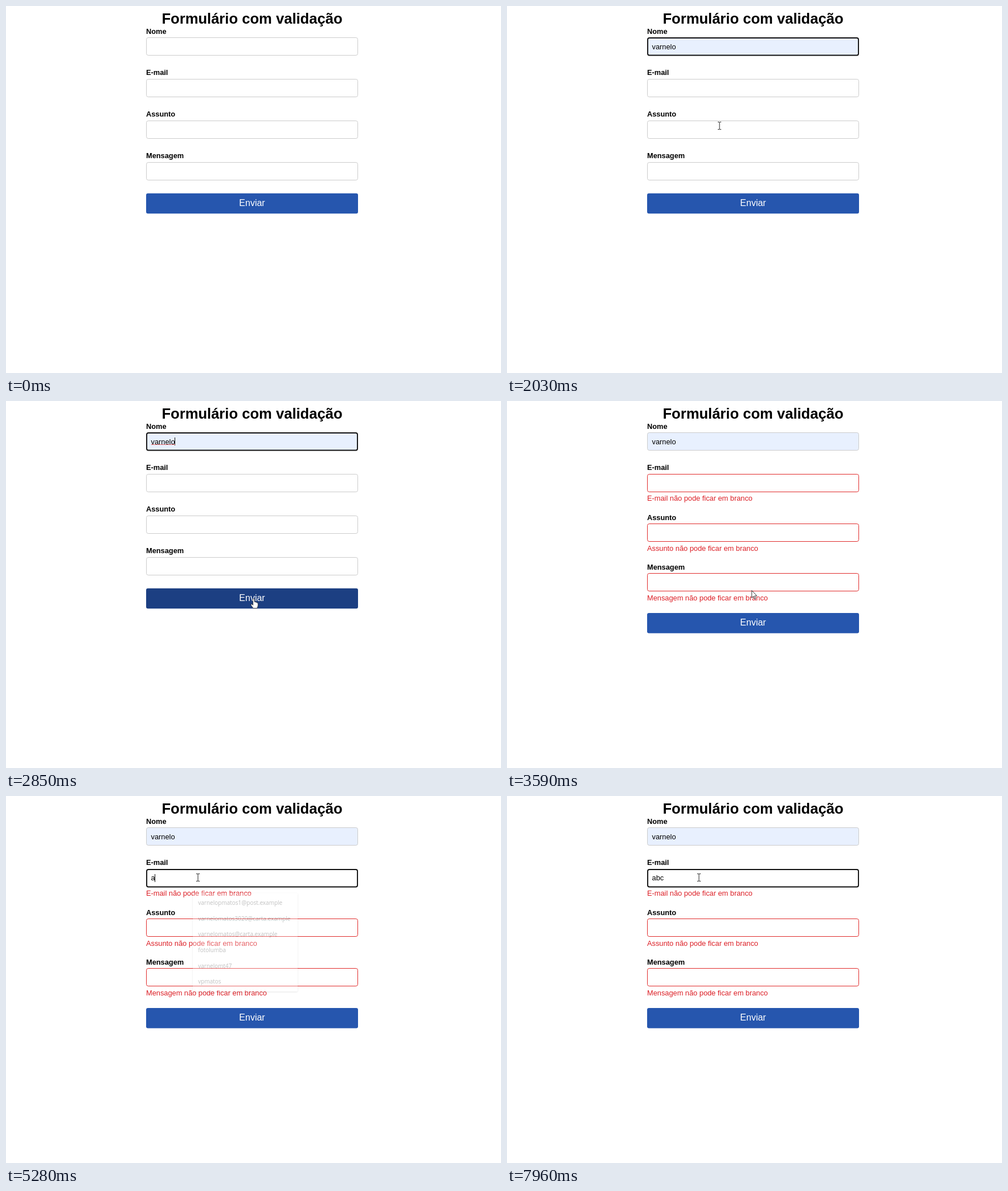
These frames come from a looping animation (869x644 px, 8000 ms). An HTML page:

```html
<!DOCTYPE html>
<html lang="pt-BR">
<head>
<meta charset="utf-8">
<title>Formulário com validação</title>
<style>
  html, body { margin: 0; width: 100%; height: 100%; overflow: hidden; background: #fff; }
  svg { display: block; width: 100%; height: 100%; }
  text { font: 12.8px "Liberation Sans", Arial, sans-serif; }
  .title { font-size: 25.6px; font-weight: bold; text-anchor: middle; }
  .label { font-weight: bold; }
  .error { fill: #dc1f26; }
  .send { font-size: 16px; fill: #fff; text-anchor: middle; }
  .menu text { font: 10px "Open Sans", "Noto Sans", sans-serif; fill: #333; }
  .tip text { font: 9.6px "Open Sans", "Noto Sans", sans-serif; fill: #444; }
  .sheet { fill: #fff; filter: drop-shadow(0 1px 1.5px rgba(0, 0, 0, .35)); }
</style>
</head>
<body>
<svg id="stage" viewBox="0 0 869 644"></svg>
<script>
const stage = document.getElementById('stage');
const LOOP = 8000, LEFT = 246, WIDTH = 372;
const NAME = 'varnelo';
const LABELS = ['Nome', 'E-mail', 'Assunto', 'Mensagem'];

const FOCUS_NAME = 730, HOVER_ITEM = 1140, PICK_ITEM = 1480, SPELLCHECK = 2540;
const SUBMIT = 2900, FOCUS_MAIL = 4080;
const KEYS = [5140, 6230, 6420];
const TIP = [5960, 6230];
const CARET_ON = [[730, 1140], [1480, 2010], [2540, 2900],
  [4080, 4680], [5140, 5690], [6230, 6900], [7430, 7960]];

const NAME_MENU = {
  x: 325, y: 94, w: 124, h: 93, peak: 341, first: 112, step: 28.5,
  items: [NAME, 'Grupo feliz KZQ.Fc', 'fddsdsds']
};
const MAIL_MENU = {
  x: 328, y: 170.5, w: 184, h: 172.5, peak: 345, first: 187.5, step: 27.6,
  items: ['varnelopmatos1@post.example', 'varnelomatos3020@carta.example',
    'varnelomatos@carta.example', 'fotolumba', 'varnelomt47', 'vpmatos']
};

// Pointer hot spot: time, x, y
const PATH = [
  [170, 778, 612], [350, 560, 390], [560, 228, 97], [720, 298, 75],
  [1000, 298, 75], [1180, 345, 112], [1480, 348, 114], [1750, 373, 206],
  [1820, 389, 253], [1900, 389, 253], [1960, 376, 226], [2030, 373, 210],
  [2200, 385, 235], [2580, 435, 345], [2900, 435, 347], [3190, 436, 380],
  [3530, 436, 380], [3590, 430, 333], [3930, 337, 143]
];

const clamp = v => Math.max(0, Math.min(1, v));
const ramp = (t, from, to) => clamp((t - from) / (to - from));
const within = (t, [from, to]) => t >= from && t < to;

const pen = document.createElement('canvas').getContext('2d');
pen.font = '12.8px "Liberation Sans", Arial, sans-serif';
const textWidth = s => pen.measureText(s).width;

const text = (x, y, s, cls = '') => `<text x="${x}" y="${y}" class="${cls}">${s}</text>`;
const rect = (x, y, w, h, attrs) => `<rect x="${x}" y="${y}" width="${w}" height="${h}" ${attrs}/>`;

// Each error line below a field pushes the following rows down.
const rowTop = (row, failed) => 55.6 + 72.8 * row + (failed ? 14.4 * Math.max(0, row - 1) : 0);
const buttonTop = failed => rowTop(4, failed) - 18;

function pointerAt(t) {
  const next = PATH.findIndex(p => p[0] > t);
  if (next < 0) return PATH[PATH.length - 1].slice(1);
  const [t0, x0, y0] = PATH[next - 1], [t1, x1, y1] = PATH[next];
  const k = (t - t0) / (t1 - t0);
  return [x0 + (x1 - x0) * k, y0 + (y1 - y0) * k];
}

function field(row, s) {
  const top = rowTop(row, s.failed), y = Math.floor(top);
  const value = row === 0 ? s.name : row === 1 ? s.mail : '';
  const bad = s.failed && row > 0;
  const fill = row === 0 && s.name ? '#e8f0fe' : '#fff';
  let out = text(LEFT, top - 7, LABELS[row], 'label');
  out += s.focus === row
    ? rect(LEFT + 1, y + 1, WIDTH - 2, 30.5, `rx="3" fill="${fill}" stroke="#101010" stroke-width="1.9"`)
    : rect(LEFT + .5, y + .5, WIDTH - 1, 31, `rx="3.2" fill="${fill}" stroke="${bad ? '#e02b2b' : '#ccc'}"`);
  out += text(254.6, top + 20, value);
  if (bad) out += text(LEFT, top + 47, `${LABELS[row]} não pode ficar em branco`, 'error');
  if (s.focus === row && s.caret) {
    const x = Math.max(255, Math.floor(254.7 + textWidth(value)));
    out += rect(x, y + 9, 1, 14, 'fill="#111"');
  }
  return out;
}

function menu(m, alpha, active = -1) {
  if (!alpha) return '';
  const rows = m.items.map((item, i) => {
    const mid = m.first + i * m.step;
    const mark = i === active ? rect(m.x, mid - m.step / 2, m.w, m.step, 'fill="#e8e8e9"') : '';
    return mark + text(m.x + 9.3, mid + 3.6, item);
  });
  return `<g class="menu" opacity="${alpha}"><g class="sheet">` +
    rect(m.x, m.y, m.w, m.h, 'rx="2"') +
    `<path d="M${m.peak - 6} ${m.y}l6 -5.5l6 5.5z"/></g>${rows.join('')}</g>`;
}

function tooltip() {
  return '<g class="tip">' + rect(343.5, 154.5, 303, 19, 'fill="#fff" stroke="#bbb"') +
    text(348, 168, 'Inclua um "@" no endereço de e-mail. "a" está sem um "@".') + '</g>';
}

function pointer([x, y], failed) {
  const inside = (top, h) => x > LEFT && x < LEFT + WIDTH && y > top && y < top + h;
  const overField = LABELS.some((_, row) => inside(rowTop(row, failed), 29.5));
  const shape = overField
    ? '<path d="M-3 -6.5H-1L0 -5.7L1 -6.5H3M0 -5.7V5.7M-3 6.5H-1L0 5.7L1 6.5H3" fill="none" stroke="#222"/>'
    : inside(buttonTop(failed), 35.2)
      ? `<path d="M-1.4 1Q0 -1 1.4 1V6Q3 5 3.8 6.6Q5.2 6 5.8 7.5Q7.4 7 7.4 9V12Q7 15 5.5 17H-1
         L-4.8 11.5Q-5.5 9.5 -3.8 9.5L-1.4 11.5Z" fill="#fff" stroke="#222" stroke-width=".8"/>`
      : '<path d="M0 0V13L3 10.3L5 15.2L7 14.3L5 9.5H9Z" fill="#fff" stroke="#222" stroke-width=".9"/>';
  return `<g transform="translate(${x} ${y})">${shape}</g>`;
}

function draw(t) {
  const failed = t >= SUBMIT;
  const pos = t >= PATH[0][0] ? pointerAt(t) : null;
  const state = {
    failed,
    name: t >= HOVER_ITEM ? NAME : '',
    mail: 'abc'.slice(0, KEYS.filter(k => t >= k).length),
    focus: t >= FOCUS_MAIL ? 1 : t >= FOCUS_NAME && !failed ? 0 : -1,
    caret: CARET_ON.some(span => within(t, span))
  };
  const top = buttonTop(failed);
  const hover = pos && pos[1] > top && pos[1] < top + 35.2 && pos[0] > LEFT && pos[0] < LEFT + WIDTH;

  let out = text(432, 31, 'Formulário com validação', 'title');
  out += LABELS.map((_, row) => field(row, state)).join('');
  if (within(t, [SPELLCHECK, SUBMIT]))
    out += `<path d="M255 76.5h${textWidth(NAME)}" stroke="#e33" stroke-dasharray="1.6 .8"/>`;
  out += rect(LEFT, top, WIDTH, 35.4, `rx="3.2" fill="${hover ? '#1c3f82' : '#2656ae'}"`);
  out += text(432, top + 22.4, 'Enviar', 'send');
  out += menu(NAME_MENU, ramp(t, 780, 900) * (1 - ramp(t, PICK_ITEM, 1640)), t >= HOVER_ITEM ? 0 : -1);
  out += menu(MAIL_MENU, ramp(t, FOCUS_MAIL, 4140) * (1 - ramp(t, 5165, 5330)));
  if (within(t, TIP)) out += tooltip();
  if (pos) out += pointer(pos, failed);
  stage.innerHTML = out;
}

const start = performance.now();
function tick() {
  draw((performance.now() - start) % LOOP);
  requestAnimationFrame(tick);
}
tick();
</script>
</body>
</html>
```
